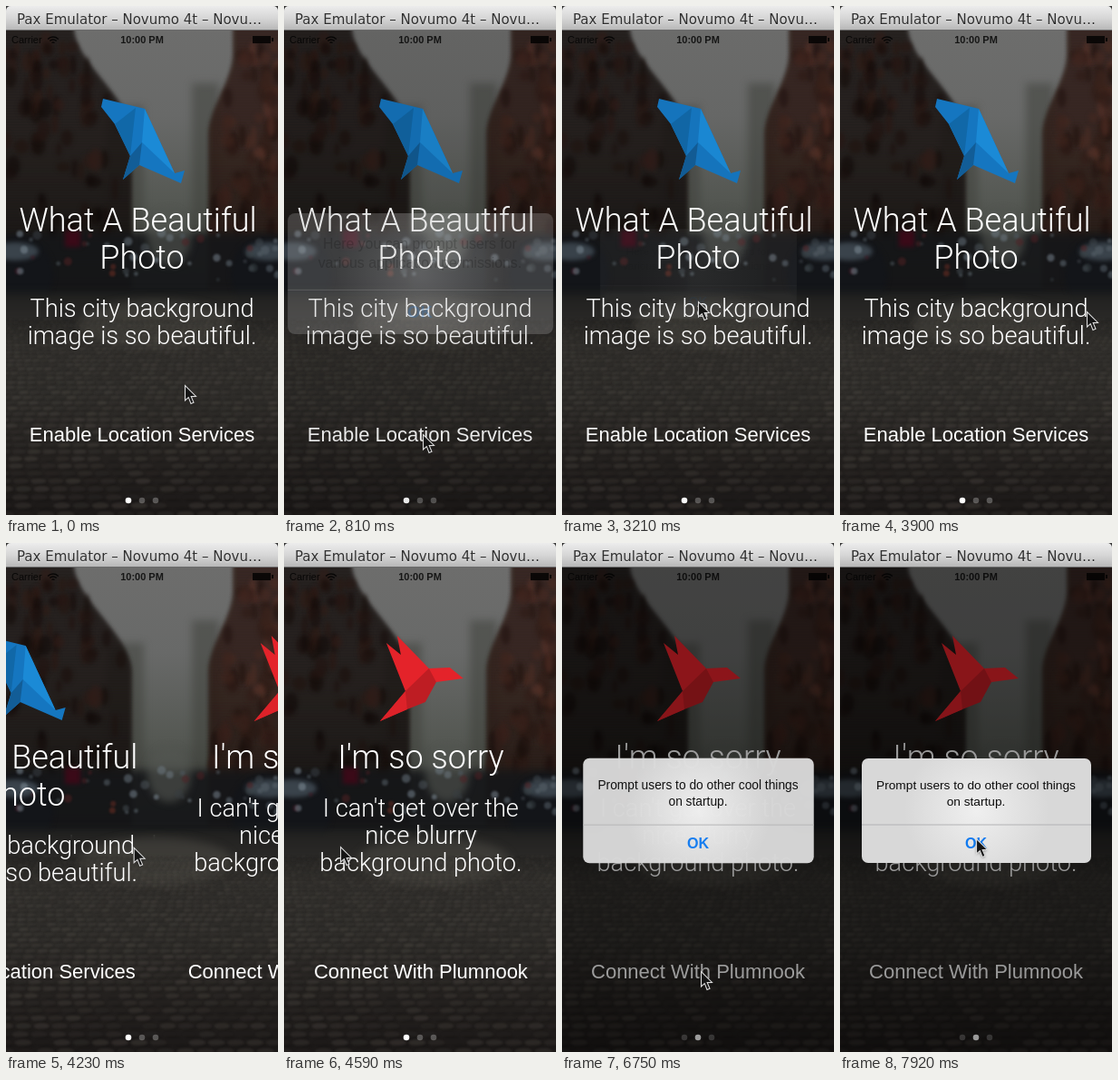
Write an HTML page with a canvas that moves like this. It is 300 px wide and 560 px high and loops after 8000 ms.

```html
<!DOCTYPE html>
<html lang="en">
<head>
<meta charset="utf-8">
<title>Onboarding walkthrough</title>
<style>
  html, body { margin: 0; width: 100%; height: 100%; overflow: hidden; background: #000; }
  canvas { display: block; width: 300px; height: 560px; }
</style>
</head>
<body>
<canvas id="stage" width="300" height="560"></canvas>
<script>
const W = 300, H = 560, MID = W / 2, LOOP = 8000, STEP = 30, BAR = 27;
const ctx = document.getElementById('stage').getContext('2d');
const LIGHT = 'Roboto, "Liberation Sans", sans-serif';
const SANS = '"Liberation Sans", Arial, sans-serif';

const clamp01 = v => Math.min(1, Math.max(0, v));
const span = (t, a, b) => clamp01((t - a) / (b - a));
const smooth = p => p * p * (3 - 2 * p);
const easeOut = p => 1 - (1 - p) ** 3;
const mix = (a, b, p) => a + (b - a) * p;

function poly(c, fill, ...points) {
  c.beginPath();
  for (const [x, y] of points) c.lineTo(x, y);
  c.closePath();
  c.fillStyle = fill;
  c.fill();
}

function blob(c, x, y, rx, ry, fill) {
  c.beginPath();
  c.ellipse(x, y, rx, ry, 0, 0, Math.PI * 2);
  c.fillStyle = fill;
  c.fill();
}

function gradient(c, y0, y1, ...colors) {
  const g = c.createLinearGradient(0, y0, 0, y1);
  colors.forEach((color, i) => g.addColorStop(i / (colors.length - 1), color));
  return g;
}

function text(str, x, y, font, fill = '#fff', align = 'center') {
  ctx.font = font;
  ctx.fillStyle = fill;
  ctx.textAlign = align;
  ctx.fillText(str, x, y);
}

function seeded(seed) {
  return () => (seed = (seed * 16807) % 2147483647) / 2147483647;
}

// Soft, darkened street scene, rendered once.
const HORIZON = 310;
const leftEdge = y => mix(74, 138, smooth(span(y, 20, 140)));
const rightEdge = y => mix(251, 224, smooth(span(y, 50, 140)));

function drawFacades(c, rnd) {
  c.filter = 'blur(2px)';
  for (let y = 0; y < HORIZON; y += 3) {
    const shade = 1 - 0.35 * span(y, 150, HORIZON);
    c.fillStyle = `rgb(${26 * shade}, ${20 * shade}, ${18 * shade})`;
    c.fillRect(-10, y, leftEdge(y) + 10, 4);
    c.fillStyle = `rgb(${46 * shade}, ${28 * shade}, ${22 * shade})`;
    c.fillRect(rightEdge(y), y, W, 4);
  }
  for (let i = 0; i < 150; i++) {
    const y = 40 + rnd() * 210, depth = rnd(), onRight = i % 2;
    const x = onRight ? mix(rightEdge(y) + 4, W, depth) : mix(leftEdge(y) - 6, 0, depth);
    const red = (onRight ? 30 + rnd() * 62 : 16 + rnd() * 34) * (1 - 0.5 * span(y, 170, 250));
    blob(c, x, y, 3 + rnd() * 5, 5 + rnd() * 9, `rgba(${red}, ${red * 0.58}, ${red * 0.46}, .6)`);
  }
}

function drawTraffic(c, rnd) {
  c.filter = 'blur(4px)';
  c.fillStyle = 'rgba(22,23,25,.9)';
  c.fillRect(-10, 250, W + 20, 70);
  blob(c, 180, 255, 24, 30, 'rgba(84,88,82,.6)');
  c.filter = 'blur(2.5px)';
  c.fillStyle = '#3a0a18';
  c.fillRect(65, 247, 17, 18);
  for (const side of [-1, 1]) {
    const x = MID + side * 134;
    blob(c, x, 296, 36, 42, '#131519');
    blob(c, x + side * 6, 270, 26, 10, '#3a434b');
  }
  c.filter = 'blur(1.3px)';
  for (let i = 0; i < 48; i++) {
    const glow = 60 + rnd() * 90, r = 2 + rnd() * 3;
    const tint = i % 5 ? `${glow * 0.9}, ${glow}, ${glow * 1.08}` : `${glow}, ${glow * 0.4}, 35`;
    blob(c, rnd() * W, 250 + rnd() * 55, r, r, `rgba(${tint}, .5)`);
  }
}

function drawRoad(c, rnd) {
  c.filter = 'blur(5px)';
  c.fillStyle = gradient(c, HORIZON, H, '#1f1f1e', '#32302d', '#2e2c29', '#24211f', '#1b1817');
  c.fillRect(-20, HORIZON + 6, W + 40, H);
  blob(c, 165, 350, 85, 26, 'rgba(84,82,77,.45)');
  c.filter = 'blur(.8px)';
  for (let y = 345; y < H; y += 3 + (y - 340) / 32) {
    const size = 3 + (y - 340) / 22;
    for (let x = -rnd() * size; x < W; x += size * 1.7) {
      blob(c, x, y, size * 0.75, size * 0.28, `rgba(150,142,130,${rnd() * 0.14})`);
      blob(c, x + size * 0.4, y + size * 0.3, size * 0.7, 0.8, 'rgba(0,0,0,.22)');
    }
  }
}

function makeStreet() {
  const canvas = document.createElement('canvas');
  canvas.width = W;
  canvas.height = H;
  const c = canvas.getContext('2d');
  const rnd = seeded(41);
  c.fillStyle = gradient(c, BAR, HORIZON, '#6d6d6c', '#686968', '#555853', '#343632');
  c.fillRect(0, 0, W, HORIZON);
  c.filter = 'blur(4px)';
  c.fillStyle = 'rgba(62,64,58,.5)';
  c.fillRect(205, 85, 30, 200);
  c.fillRect(110, 110, 42, 180);
  drawFacades(c, rnd);
  drawTraffic(c, rnd);
  drawRoad(c, rnd);
  return canvas;
}
const street = makeStreet();

function blueBird() {
  const crown = [153, 113], chest = [150, 150], rump = [186, 184], hip = [147, 175];
  const nape = [120, 130], foot = [129, 191], knee = [137, 165];
  poly(ctx, '#1576c0', [107, 102], crown, rump, [197, 181], [193, 195], hip, foot, knee, nape, [105, 111]);
  poly(ctx, '#1b8ad6', crown, rump, chest);
  poly(ctx, '#1168a8', [143, 112], nape, knee);
  poly(ctx, '#125d97', knee, chest, hip, foot);
}

function redBird() {
  const shoulder = [133, 163], neck = [159, 138], throat = [167, 153], tail = [105, 196];
  poly(ctx, '#e4232a', [124, 102], neck, [182, 137], [197, 149], throat, shoulder, [112, 110], [128, 123]);
  poly(ctx, '#be1d23', shoulder, neck, throat, [155, 175], [135, 183], tail);
  poly(ctx, '#dd2229', shoulder, [135, 183], tail);
}

const pages = [
  {
    bird: blueBird,
    title: ['What A Beautiful ', 'Photo'],
    body: ['This city background', 'image is so beautiful.'],
    button: 'Enable Location Services',
    alert: ['Here you can prompt users for', 'various application permissions.']
  },
  {
    bird: redBird,
    title: ["I'm so sorry"],
    body: ["I can't get over the", 'nice blurry', 'background photo.'],
    button: 'Connect With Plumnook',
    alert: ['Prompt users to do other cool things', 'on startup.']
  }
];

function drawPage(page, x) {
  if (Math.abs(x) >= W) return;
  ctx.save();
  ctx.translate(x, 0);
  page.bird();
  const bodyY = 260 + page.title.length * 41;
  page.title.forEach((line, i) => text(line, MID, 248 + i * 41, `300 36px ${LIGHT}`));
  page.body.forEach((line, i) => text(line, MID, bodyY + i * 30, `300 27.2px ${LIGHT}`));
  text(page.button, MID, 479, `22px ${SANS}`);
  ctx.restore();
}

function drawStatus() {
  const ink = 'rgba(0,0,0,.8)';
  text('Carrier', 6, 41, `11px ${SANS}`, ink, 'left');
  text('10:00 PM', MID, 41, `bold 11px ${SANS}`, ink);
  ctx.strokeStyle = ink;
  ctx.lineWidth = 1.4;
  for (let r = 2; r < 9; r += 3) {
    ctx.beginPath();
    ctx.arc(52, 42, r, -Math.PI * 0.76, -Math.PI * 0.24);
    ctx.stroke();
  }
  ctx.fillStyle = ink;
  ctx.fillRect(272, 33, 20, 8);
  ctx.fillRect(293, 35, 2, 4);
}

function drawTitleBar() {
  ctx.fillStyle = '#3a3a3a';
  ctx.fillRect(0, 0, W, BAR);
  ctx.beginPath();
  ctx.roundRect(0, 0, W, BAR, [5, 5, 0, 0]);
  ctx.fillStyle = gradient(ctx, 0, BAR, '#ececec', '#d6d6d6', '#b6b6b6');
  ctx.fill();
  ctx.fillStyle = '#6a6a6a';
  ctx.fillRect(0, BAR - 1, W, 1);
  const font = '15px "DejaVu Sans", sans-serif';
  const label = 'Pax Emulator – Novumo 4t – Novu…';
  text(label, 12, 21, font, 'rgba(255,255,255,.55)', 'left');
  text(label, 12, 20, font, '#303030', 'left');
}

function drawAlert(lines, alpha, scale) {
  const x = 24, y = 237, w = 253, h = 115, cx = x + w / 2, cy = y + h / 2;
  ctx.save();
  ctx.globalAlpha = alpha;
  ctx.translate(cx, cy);
  ctx.scale(scale, scale);
  ctx.translate(-cx, -cy);
  ctx.beginPath();
  ctx.roundRect(x, y, w, h, 7);
  ctx.fillStyle = '#d8d8d8';
  ctx.fill();
  const glow = ctx.createRadialGradient(cx, cy, 0, cx, cy, 80);
  glow.addColorStop(0, 'rgba(245,245,245,.8)');
  glow.addColorStop(1, 'rgba(245,245,245,0)');
  ctx.fillStyle = glow;
  ctx.fill();
  ctx.fillStyle = '#b4b4b5';
  ctx.fillRect(x, y + 72.5, w, 1);
  lines.forEach((line, i) => text(line, MID, 271 + i * 18, `13.7px ${SANS}`, '#0b0b0b'));
  text('OK', MID, 336, `bold 16px ${SANS}`, '#107af0');
  ctx.restore();
}

const spot = {
  rest: [197, 417], button: [153, 471], above: [152, 393], ok: [150, 325],
  dragFrom: [272, 336], dragTo: [62, 334], waiting: [105, 395]
};
const DRAG = 4005, RELEASE = 4300, SETTLED = 4660;

// Each move eases from wherever the pointer is to the named spot.
const moves = [
  [0, 480, spot.button], [960, 1620, spot.above], [1920, 2460, spot.ok],
  [3240, 3870, spot.dragFrom], [DRAG, 4390, spot.dragTo], [4680, 5250, spot.waiting],
  [5550, 6120, spot.button], [7110, 7860, spot.ok]
];

function pointerAt(t) {
  return moves.reduce((from, [start, end, to]) => {
    const p = smooth(span(t, start, end));
    return from.map((v, i) => mix(v, to[i], p));
  }, spot.rest);
}

function drawPointer(x, y) {
  ctx.save();
  ctx.translate(x, y);
  ctx.shadowColor = 'rgba(0,0,0,.5)';
  ctx.shadowBlur = 3;
  ctx.shadowOffsetY = 1;
  poly(ctx, '#151515', [0.5, 0.5], [0.5, 17], [4.3, 13.6], [7, 20.5], [10, 19.2], [7.2, 12.6], [12.5, 12.4]);
  ctx.shadowColor = 'transparent';
  ctx.strokeStyle = '#dcdcdc';
  ctx.lineWidth = 1.1;
  ctx.stroke();
  ctx.restore();
}

// The page follows the drag, then glides to rest after release.
function scrollAt(t) {
  if (t < DRAG) return 0;
  const dragged = spot.dragFrom[0] - pointerAt(Math.min(t, RELEASE))[0];
  return mix(dragged, W, easeOut(span(t, RELEASE, SETTLED)));
}

function alertAt(t, opens, closes) {
  const shown = easeOut(span(t, opens, opens + 390));
  const gone = smooth(span(t, closes, closes + 380));
  return { alpha: shown * (1 - gone), scale: mix(1.2, 1, shown) - 0.15 * gone };
}

function draw(t) {
  ctx.drawImage(street, 0, 0);
  drawStatus();

  const scroll = scrollAt(t);
  pages.forEach((page, i) => drawPage(page, i * W - scroll));

  const current = t <= SETTLED ? 0 : 1;
  for (let i = 0; i < 3; i++) {
    blob(ctx, 135 + i * 15, 544, 3.3, 3.3, i === current ? '#fff' : 'rgba(255,255,255,.27)');
  }

  const { alpha, scale } = current ? alertAt(t, 6480, LOOP) : alertAt(t, 780, 2880);
  ctx.fillStyle = `rgba(0,0,0,${0.4 * alpha})`;
  ctx.fillRect(0, BAR, W, H - BAR);
  drawAlert(pages[current].alert, alpha, scale);

  drawTitleBar();
  drawPointer(...pointerAt(t));
}

const begin = performance.now();
function tick() {
  const t = (performance.now() - begin) % LOOP;
  draw(Math.floor(t / STEP) * STEP);
  requestAnimationFrame(tick);
}
tick();
</script>
</body>
</html>
```
